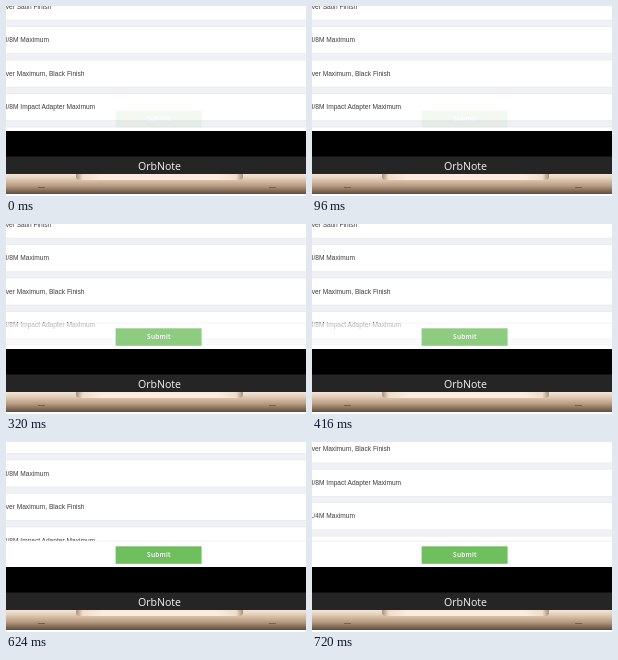
These frames come from a looping animation (300x190 px, 0.8 s). An HTML page:

```html
<!DOCTYPE html>
<html lang="en">
<head>
<meta charset="utf-8">
<title>Laptop order form</title>
<style>
  html, body { margin: 0; width: 100%; height: 100%; overflow: hidden; background: #fff; }
  svg { display: block; width: 100vw; height: 100vh; }
  .item { font: 6.6px "Liberation Sans", Arial, sans-serif; fill: #3c3c3c; }
  .label { font: 600 6.5px "Open Sans", sans-serif; letter-spacing: .25px; fill: #fff; }
  .brand { font: 10.6px "Open Sans", sans-serif; fill: #f4f4f4; }
</style>
</head>
<body>
<svg viewBox="0 0 300 190">
  <defs>
    <clipPath id="screen"><rect width="300" height="125"/></clipPath>
    <linearGradient id="gold" x2="0" y2="1">
      <stop offset="0" stop-color="#f3e6d8"/>
      <stop offset=".2" stop-color="#e6d2bd"/>
      <stop offset=".4" stop-color="#cfb69d"/>
      <stop offset=".6" stop-color="#b59b82"/>
      <stop offset=".8" stop-color="#8b735e"/>
      <stop offset="1" stop-color="#5f4d3f"/>
    </linearGradient>
    <linearGradient id="notch">
      <stop offset="0" stop-color="#a98f78"/>
      <stop offset=".04" stop-color="#f0ddc9"/>
      <stop offset=".15" stop-color="#fbecdd"/>
      <stop offset=".85" stop-color="#fbecdd"/>
      <stop offset=".96" stop-color="#f0ddc9"/>
      <stop offset="1" stop-color="#a98f78"/>
    </linearGradient>
  </defs>

  <g clip-path="url(#screen)">
    <rect width="300" height="125" fill="#fff"/>
    <g id="list"></g>
    <g id="footer">
      <rect y="99" width="300" height="26" fill="#fff"/>
      <rect y="98.7" width="300" height=".6" fill="#e2e4e6"/>
    </g>
    <g id="button">
      <rect x="109.6" y="104.3" width="86" height="17.5" fill="#6fbf5e"/>
      <text class="label" x="153" y="115.3" text-anchor="middle">Submit</text>
    </g>
  </g>

  <rect y="125" width="300" height="43" fill="#000"/>
  <rect y="150.5" width="300" height="17.5" fill="#252525"/>
  <text class="brand" x="153.5" y="164" text-anchor="middle">OrbNote</text>

  <rect y="168" width="300" height="20" fill="url(#gold)"/>
  <path d="M70 168H237V171Q237 174 232 174H75Q70 174 70 171Z" fill="url(#notch)"/>
  <path d="M32 181.5h7m224 0h7" stroke="#6b5646" stroke-width=".8"/>
</svg>
<script>
  const el = id => document.getElementById(id);
  const PITCH = 33.5, LOOP = 800;
  const items = [
    [-.3, "ver Satin Finish"],
    [-2.2, "8/8M Maximum"],
    [-.3, "ver Maximum, Black Finish"],
    [-2.2, "8/8M Impact Adapter Maximum"],
    [-2.2, "1/4M Maximum"],
    [-.3, "ver Satin Finish"]
  ];

  el("list").innerHTML = items.map(([x, text], i) => {
    const y = 2.8 + i * PITCH;
    return `<text class="item" x="${x}" y="${y}">${text}</text>
      <rect y="${y + 11.4}" width="300" height="6.3" fill="#f0f1f5"/>
      <path d="M0 ${y + 11.4}h300m0 6.3h-300" stroke="#e3e5e9" stroke-width=".6"/>`;
  }).join("");

  // Each pose holds until the next: start, scroll, footer and button opacity
  const poses = [
    { at: 0, scroll: 0, footer: 0, button: .08 },
    { at: 160, scroll: 0, footer: .5, button: .7 },
    { at: 320, scroll: 0, footer: .65, button: .78 },
    { at: 480, scroll: 2.7, footer: 1, button: 1 },
    { at: 720, scroll: 60.3, footer: 1, button: 1 }
  ];

  function draw(t) {
    const p = poses.filter(pose => pose.at <= t).pop();
    el("list").setAttribute("transform", `translate(0 ${-p.scroll})`);
    el("footer").setAttribute("opacity", p.footer);
    el("button").setAttribute("opacity", p.button);
  }

  const start = performance.now();
  function tick() {
    draw((performance.now() - start) % LOOP);
    requestAnimationFrame(tick);
  }
  draw(0);
  requestAnimationFrame(tick);
</script>
</body>
</html>
```
